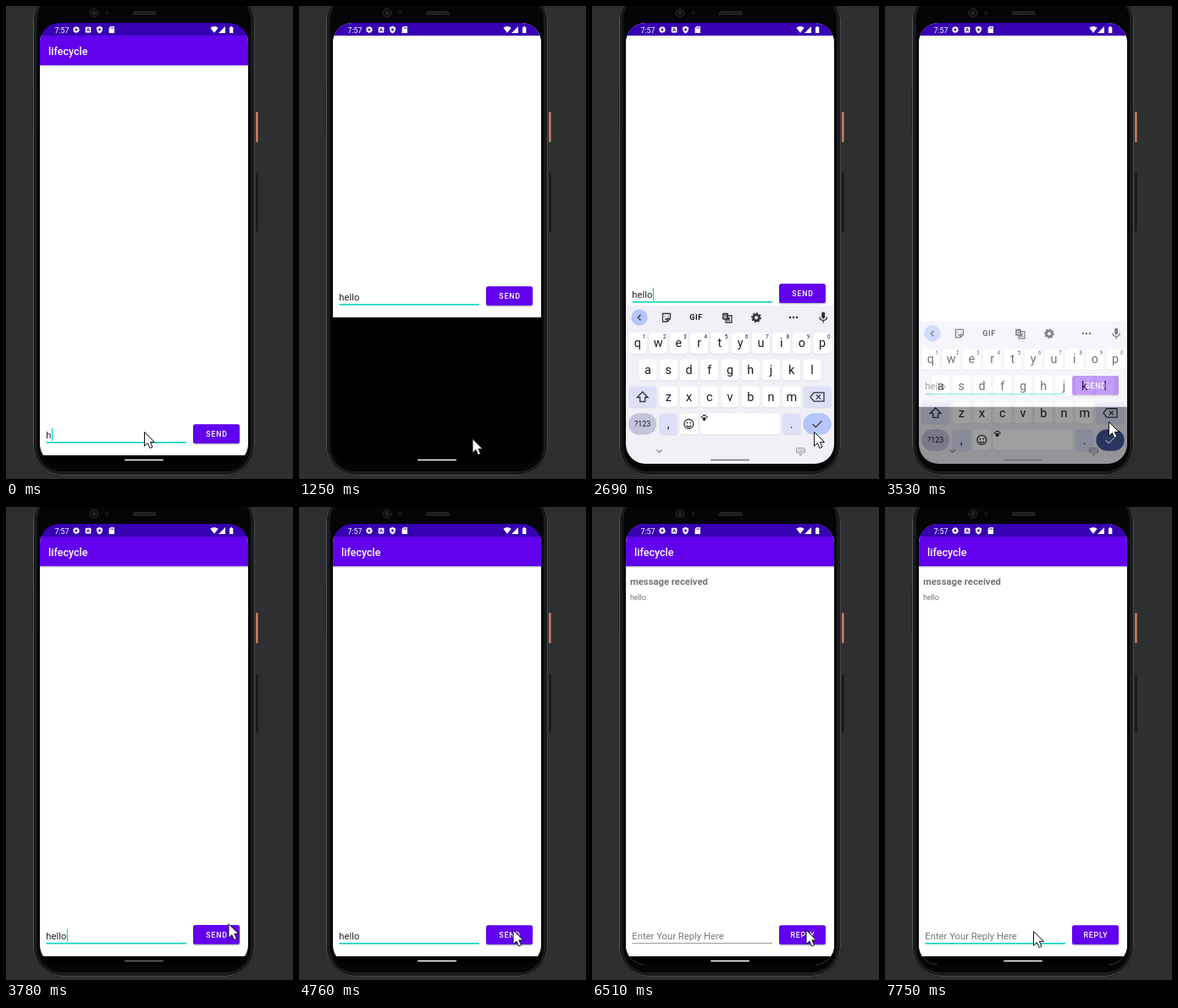
These frames come from a looping animation (339 by 559 pixels, 8 s). An HTML page:

```html
<!DOCTYPE html>
<html lang="en">
<head>
<meta charset="utf-8">
<title>Lifecycle demo</title>
<style>
html, body { margin: 0; width: 100%; height: 100%; overflow: hidden; background: #2d2f31; }
svg { display: block; width: 100%; height: 100%; }
text { font-family: Roboto, sans-serif; }
.title { font-size: 12.53px; font-weight: 500; fill: #fff; }
.input { font-size: 11.28px; fill: #222; }
.button { font-size: 8.77px; font-weight: 500; letter-spacing: .78px; fill: #fff; text-anchor: middle; }
.key { font-size: 14.4px; fill: #1b1b23; text-anchor: middle; }
.line { fill: none; stroke: #33343c; stroke-width: 1.3; }
</style>
</head>
<body>
<svg id="stage" viewBox="0 0 339 559"></svg>
<script>
const LOOP = 8000, TICK = 121.5;
const rect = (x, y, w, h, fill, r = 0, extra = '') =>
  `<rect x="${x}" y="${y}" width="${w}" height="${h}" rx="${r}" fill="${fill}" ${extra}/>`;
const text = (x, y, cls, str, extra = '') => `<text x="${x}" y="${y}" class="${cls}" ${extra}>${str}</text>`;
const path = (d, extra = 'class="line"') => `<path d="${d}" ${extra}/>`;
const circle = (x, y, r, extra) => `<circle cx="${x}" cy="${y}" r="${r}" ${extra}/>`;
const gear = (x, y, r, color) =>
  circle(x, y, r * .58, `fill="none" stroke="${color}" stroke-width="${r * .45}"`) +
  circle(x, y, r * .86, `fill="none" stroke="${color}" stroke-width="${r * .28}" pathLength="16" stroke-dasharray="1 1"`);

function phone() {
  const rim = (inset, color, width) => rect(32.3 + inset, -18 + inset, 261.2 - 2 * inset, 572.5 - 2 * inset,
    'none', 34 - inset, `stroke="${color}" stroke-width="${width}"`);
  return rect(295.3, 125, 2.2, 36, '#e28766', 1) + rect(295.3, 197, 2.4, 70, '#17181a', 1) +
    rect(30.5, 94, 1.6, 56, '#242527', 1) +
    rect(32, -18.5, 262, 573.5, '#050506', 34) +
    rim(.2, '#58595b', 1) + rim(2, '#1d1e20', 2) + rim(3.8, '#36373a', .7) +
    circle(104, 8, 5, 'fill="#101113" stroke="#29292d"') + circle(104, 8, 2, 'fill="#242833"') +
    circle(119.5, 8, 2.5, 'fill="#141416"') +
    path('M151 7H177M150 9.5H178', 'stroke="#55565a" stroke-width="1.6" stroke-dasharray="1.2 1"');
}

const statusIcons = () => text(57.5, 31.6, 'title', '7:57', 'style="font-size:8.77px;font-weight:400"') +
  gear(83, 28, 4, '#fff') +
  rect(93.8, 24.7, 6.6, 6.8, '#fff', 1) +
  path('M95.4 30L97.1 26L98.8 30M96 28.8H98.2', 'fill="none" stroke="#3700b3" stroke-width=".8"') +
  path('M110.5 23.8L114 25.2V28Q113.6 31 110.5 32.4Q107.4 31 107 28V25.2Z', 'fill="#fff"') +
  circle(110.5, 28, 1.4, 'fill="#3700b3"') +
  path('M123.4 24H128V32H121.6V26Z', 'fill="#fff"') +
  path('M124 25V27M125.4 25V27M126.8 25V27', 'stroke="#3700b3" stroke-width=".6"') +
  path('M241.3 25.8Q246 22.3 250.7 25.8L246 31.8ZM251 32H259V24Z', 'fill="#fff"') +
  path('M264 25H265.3V24H267V25H268.3V32H264Z', 'fill="#fff"');

const appWindow = (id, label, body) => `<g id="${id}">
  ${rect(40, 531, 246, 10, '#000')}
  <g id="${id}Page">
    ${rect(40, 35, 246, 496, '#fff')}
    ${rect(40, 70, 246, 2.5, 'url(#shade)')}
    ${rect(40, 35, 246, 35, '#6200ee')}
    ${text(50, 57.7, 'title', 'lifecycle')}
    ${body}
    ${rect(221, 495, 55, 23.5, '#000', 2.5, 'opacity=".22"')}
    ${rect(221, 494.2, 55, 22.8, '#6200ee', 2.5)}
    ${rect(221, 494.2, 55, 22.8, '#fff', 2.5, `id="${id}Ripple" opacity="0"`)}
    ${text(249, 509, 'button', label)}
  </g>
  ${rect(40, 20, 246, 15, '#3700b3')}
</g>`;

function keyboard() {
  const key = (x, y, w, fill, label = '') => rect(x, y + .8, w, 25, '#d4d3dc', 4) +
    rect(x, y, w, 25, fill, 4) + text(x + w / 2, y + 17.2, 'key', label);
  const row = (letters, x, y) => [...letters].map((c, i) => key(x + i * 24.25, y, 21.4, '#fff', c)).join('');
  const digits = [...'1234567890'].map((c, i) =>
    text(61.5 + i * 24.25, 393, 'key', c, 'style="font-size:6.3px"')).join('');
  const dot = (x, y, r) => circle(x, y, r, 'fill="#222"');
  const toes = [-3, -1, 1, 3].map(dx => dot(132.6 + dx, 483.5 + dx * dx * .25, 1)).join('');
  return `<g id="keys">
    ${rect(40, 354, 246, 260, '#f1f0f7')}
    ${circle(56, 368, 9.7, 'fill="#b5c6fc"')}${path('M57.5 364.8L54.2 368L57.5 371.2')}
    ${path('M83.5 363.5H92.5V369.5L89 373H83.5ZM92.5 369.5H89V373M86 366.5V367.5M90 366.5V367.5M86 370H89')}
    ${text(123, 371.2, 'key', 'GIF', 'style="font-size:9px;font-weight:700;letter-spacing:.6px"')}
    ${rect(154, 362.8, 7, 8, '#44454d', 1)}${path('M158 366H165V374H158ZM160 369H163M161.5 368V369Q161 371 159.5 372M160 369.5L163 372')}
    ${text(157.3, 369, 'key', 'G', 'style="font-size:6px;fill:#fff;font-weight:700"')}
    ${gear(194, 368.3, 6, '#33343c')}
    ${[234, 238, 242].map(x => dot(x, 368, 1.2)).join('')}
    ${rect(271.2, 361.5, 4, 8, '#33343c', 2)}${path('M269 367.5Q269 371.5 273.2 371.5Q277.4 371.5 277.4 367.5M273.2 371.5V374.5')}
    ${row('qwertyuiop', 43.2, 386)}${digits}
    ${row('asdfghjkl', 55.3, 417.5)}
    ${key(43.2, 449.5, 33, '#dfe0f8')}${path('M59.7 456L66 462.5H62.7V467.5H56.7V462.5H53.4Z')}
    ${row('zxcvbnm', 79.5, 449.5)}
    ${key(249.3, 449.5, 33.5, '#dfe0f8')}${path('M258 462L262 456.8H274V467.2H262ZM264.8 459.4L270 464.6M270 459.4L264.8 464.6')}
    ${rect(43.2, 481.3, 33, 25.5, '#c4c4dd', 12.7)}${text(59.7, 497.3, 'key', '?123', 'style="font-size:9px"')}
    ${key(79.5, 481.5, 21.4, '#dfe0f8', ',')}
    ${key(103.7, 481.5, 21.4, '#fff')}${circle(114.3, 494, 5.5, 'class="line"')}
    ${dot(112.3, 492.6, .9)}${dot(116.3, 492.6, .9)}${path('M111.4 495.5Q114.3 499 117.2 495.5')}
    ${key(128, 481.5, 94, '#fff')}${dot(132.6, 488, 2.1)}${toes}
    ${key(225, 481.5, 21.4, '#dfe0f8', '.')}
    ${rect(249.3, 481.3, 33.5, 25.5, '#b5c6fc', 12.7, 'id="done"')}
    ${path('M260.7 494.2L264.3 497.7L271.5 490.4', 'id="check" fill="none" stroke-width="1.3"')}
  </g>
  <g opacity=".55">${path('M76.5 524.5L79.5 527.5L82.5 524.5')}
    ${rect(241.5, 522.5, 10, 5.5, 'none', 1, 'stroke="#33343c" stroke-width=".8"')}
    ${path('M243 524.5H251M243 526.3H251', 'stroke="#33343c" stroke-dasharray="1 .7"')}
    ${path('M245 530.3H248')}
  </g>`;
}

const stage = document.getElementById('stage');
stage.innerHTML = `<defs>
  <clipPath id="screen">${rect(40, 20, 246, 521, '#000', 23)}</clipPath>
  <linearGradient id="shade" x2="0" y2="1"><stop stop-opacity=".25"/><stop offset="1" stop-opacity="0"/></linearGradient>
</defs>
${rect(0, 0, 339, 559, '#2d2f31')}${phone()}
<g clip-path="url(#screen)">
  ${rect(40, 20, 246, 521, '#000')}
  ${appWindow('send', 'SEND',
    text(47.3, 510.7, 'input', 'h', 'id="typed"') + rect(47.5, 515, 165.5, 1.7, '#13d5c3') +
    rect(54, 499, 1.2, 15, '#03dac5', 0, 'id="caret"'))}
  ${appWindow('reply', 'REPLY',
    text(45, 92, 'input', 'message received', 'style="font-weight:700;fill:#757575"') +
    text(45, 109.8, 'input', 'hello', 'style="font-size:8.77px;fill:#757575"') +
    text(47.3, 510.7, 'input', 'Enter Your Reply Here', 'style="fill:#777"') +
    rect(47.5, 515, 165.5, 1, '#999', 0, 'id="replyLine"'))}
  <g id="keyboard">${keyboard()}</g>
  ${statusIcons()}
  ${rect(140, 535.8, 46, 1.5, '#fff', .7, 'id="handle"')}
</g>
<path id="mouse" d="M.5 .5V17.2L4.4 13.6L7 19.5L10 18.2L7.4 12.4H12.4Z" fill="#fff" stroke="#111"/>`;

const ramp = (t, start, duration) => Math.min(1, Math.max(0, (t - start) / duration));
const easeOut = (t, start, duration) => 1 - (1 - ramp(t, start, duration)) ** 3;
const within = (t, start, end) => t >= start && t < end;
const set = (id, attrs) => Object.entries(attrs).forEach(([name, value]) =>
  document.getElementById(id).setAttribute(name, value));
const zoom = s => `translate(163 281) scale(${s}) translate(-163 -281)`;

const glides = [
  { start: 1000, duration: 210, x: 204.5, y: 511 },
  { start: 1800, duration: 750, x: 262, y: 503 },
  { start: 3150, duration: 120, x: 264, y: 491 },
  { start: 3700, duration: 500, x: 252.5, y: 499.5 },
  { start: 6930, duration: 400, x: 175, y: 501 }
];
function mouseAt(t) {
  let x = 163, y = 503;
  for (const glide of glides) {
    const p = ramp(t, glide.start, glide.duration);
    x += (glide.x - x) * p;
    y += (glide.y - y) * p;
  }
  return `translate(${x} ${y})`;
}

// The caret blinks once a second, starting over whenever the field is touched.
function caretVisible(clock) {
  const restart = [-120, 630, 4260].findLast(time => time <= clock);
  return clock < 6000 && (clock - restart) % 1000 < 500;
}

function draw(now) {
  const clock = now % LOOP;
  const t = Math.floor(clock / TICK) * TICK;
  const pan = -166 * (easeOut(t, 1015, 271) - easeOut(t, 3404, 400));
  const keysShown = ramp(t, 1215, 300) - ramp(t, 3404, 315);
  const opened = easeOut(t, 6015, 290);
  const donePressed = within(clock, 3520, 3900);

  const typed = document.getElementById('typed');
  typed.textContent = 'hello'.slice(0, clock < 630 ? 1 : clock < 750 ? 3 : 5);
  set('caret', { x: 47.8 + typed.getComputedTextLength(), opacity: +caretVisible(clock) });
  set('sendPage', { transform: `translate(0 ${pan})` });
  set('sendRipple', { opacity: within(clock, 5240, 5360) ? .22 : 0 });
  set('send', { transform: zoom(1 + .066 * opened) });
  set('reply', { transform: zoom(.9 + .1 * opened), opacity: ramp(t, 6015, 100) });
  set('replyLine', clock < 7750 ? { height: 1, fill: '#999' } : { height: 1.7, fill: '#13d5c3' });
  set('keyboard', { opacity: keysShown });
  set('keys', { transform: `translate(0 ${50 * (1 - keysShown)})` });
  set('done', { fill: donePressed ? '#44579e' : '#b5c6fc' });
  set('check', { stroke: donePressed ? '#fff' : '#33343c' });
  set('handle', { fill: within(clock, 1970, 4500) ? '#707074' : '#fff' });
  set('mouse', { transform: mouseAt(t) });
  requestAnimationFrame(draw);
}
requestAnimationFrame(draw);
</script>
</body>
</html>
```
